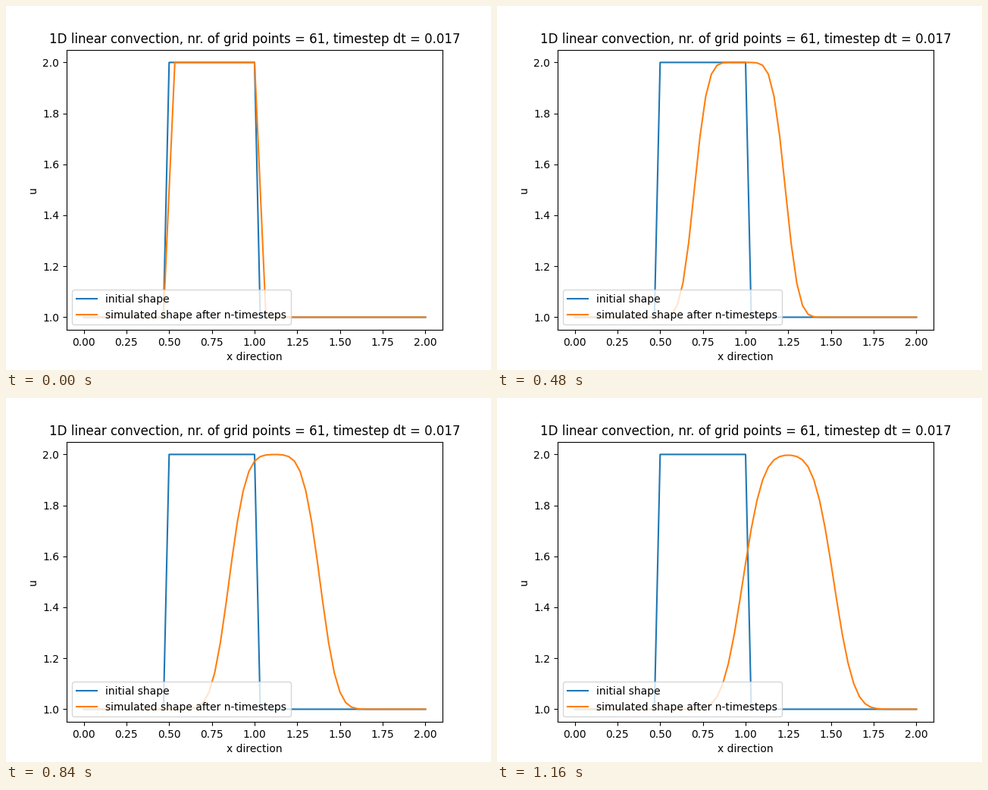
Recreate the animation shown at these times as a matplotlib script. Size 640 by 480 pixels, loop 1200 ms.

```python
import numpy as np
import matplotlib.pyplot as plt
from matplotlib.animation import FuncAnimation

POINTS = 61
LENGTH = 2.0
SPEED = 1.0
COURANT = 0.5
FRAMES = 30

dx = LENGTH / (POINTS - 1)
dt = COURANT * dx / SPEED

x = np.linspace(0, LENGTH, POINTS)
initial = np.ones(POINTS)
initial[round(0.5 / dx):round(1.0 / dx) + 1] = 2


def convect(steps):
    """Advance the initial shape with the first-order upwind scheme."""
    u = initial.copy()
    for _ in range(steps):
        u[1:] -= SPEED * dt / dx * np.diff(u)
    return u


plt.rcParams["font.family"] = "DejaVu Sans"
fig, ax = plt.subplots(figsize=(6.4, 4.8), dpi=100)
ax.plot(x, initial, label="initial shape")
wave, = ax.plot(x, convect(1), label="simulated shape after n-timesteps")
ax.set_title(f"1D linear convection, nr. of grid points = {POINTS}, "
             f"timestep dt = {dt:.3f}")
ax.set_xlabel("x direction")
ax.set_ylabel("u")
ax.legend(loc="lower left")


def update(frame):
    wave.set_ydata(convect(frame + 1))
    return wave,


anim = FuncAnimation(fig, update, frames=FRAMES, interval=40, repeat=True)
plt.show()
```
